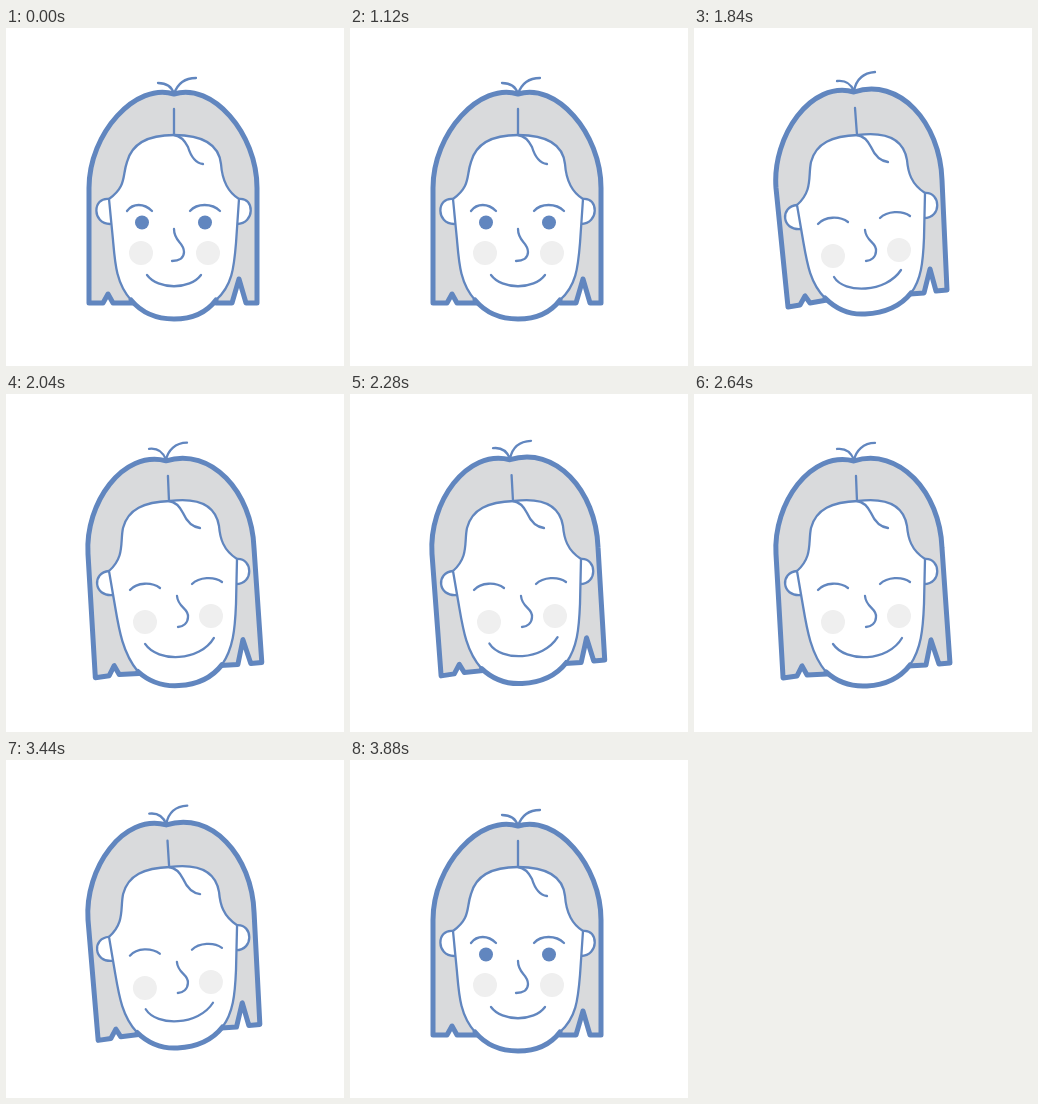
An HTML page for the animation above (5.32 s loop, 338x338 px).

```html
<!DOCTYPE html>
<html lang="en">
<head>
<meta charset="utf-8">
<title>Laughing face</title>
<style>
  html, body { margin: 0; width: 100%; height: 100%; overflow: hidden; background: #fff; }
  svg { display: block; width: 100%; height: 100%; }
  path { fill: none; stroke: #6186bf; stroke-width: 2.3; stroke-linecap: round; stroke-linejoin: round; }
  .thick { stroke-width: 5; }
  .hair { fill: #d9dadc; }
  .skin { fill: #fff; }
  .plain { stroke: none; }
</style>
</head>
<body>
<svg id="stage" viewBox="0 0 338 338"></svg>
<script>
const LOOP = 5320, STEP = 40, BOB = 560;
const stage = document.getElementById('stage');

// Each part: class, calm pose, laughing pose (head up), laughing pose (head down, if different)
const parts = [
  ['hair thick',
    'M127 275L107 275L102 266L97 275L83 275L83 160C83 105 130 54 168 66C206 54 251 105 251 160L251 275L240 275L233 251L226 275L210 275',
    'M133 272L116 275L111 268L106 277L94 279L82 160C78 108 117 52 160 64C205 49 246 94 248 152L253 262L242 263L236 241L230 265L216 266',
    'M133 280L113 281L108 272L103 282L89 284L82 160C79 109 117 56 160 67C205 53 246 98 248 154L256 269L245 270L237 246L232 271L214 272'],
  ['tuft',
    'M152 55C160 55 166 59 168 66C171 57 178 50 190 50',
    'M143 53C151 52 157 56 160 63C162 52 168 45 181 44',
    'M143 55C151 54 157 58 160 66C162 57 169 49 181 49'],
  ['skin',
    'M103 171C86 169 86 196 104 196',
    'M103 177C86 178 87 203 107 201'],
  ['skin',
    'M233 171C249 169 249 196 231 196',
    'M231 165C247 164 248 190 230 190'],
  ['skin',
    'M125 272C110 255 109 235 107 212L103 171C121 158 116 148 121 134C126 115 142 107 168 107C200 107 213 118 215 136C216 150 220 163 233 171L230 215C228 240 226 258 210 272',
    'M131 270C116 255 113 235 109 212L103 177C119 163 114 148 117 134C122 115 138 108 164 107C196 103 210 114 213 132C214 144 217 156 231 165L230 210C229 235 227 252 217 265',
    'M132 278C117 260 113 236 109 212L103 177C119 163 114 148 117 134C122 115 138 108 164 107C196 103 210 114 213 132C214 144 217 156 231 165L230 210C229 236 227 255 216 271'],
  ['skin plain',
    'M124 266L211 266L204 277L132 277',
    'M130 264L218 258L210 271L139 276',
    'M131 272L217 264L210 277L139 284'],
  ['skin thick',
    'M125 272C135 284 150 291 168 291C186 291 201 284 210 272',
    'M131 270C142 281 155 287 171 286C190 285 206 279 217 265',
    'M132 278C143 288 156 293 173 292C192 291 206 284 216 271'],
  ['parting',
    'M168 81L168 107',
    'M161 80L163 107',
    'M162 82L163 107'],
  ['curl',
    'M168 107C175 108 179 113 182 119C185 129 189 135 197 136',
    'M163 107C170 108 174 113 177 119C181 128 186 133 194 134'],
  ['nose',
    'M168 201C168 214 178 214 178 224C178 230 173 233 166 233',
    'M171 202C172 214 183 214 182 223C182 229 177 233 172 233'],
  ['mouth',
    'M141 247C152 262 184 262 195 247',
    'M140 249C150 266 192 265 207 242',
    'M139 250C152 269 194 268 208 244'],
  ['brow',
    'M121 183C127 175 138 175 146 183',
    'M124 196C131 188 146 188 154 194'],
  ['brow',
    'M184 183C191 175 206 175 214 183',
    'M186 190C193 183 208 182 216 188']
].map(([cls, calm, up, down = up]) => ({
  el: add('path', { class: cls }),
  shape: calm,
  poses: [calm, up, down].map(d => d.match(/\d+/g).map(Number))
}));

const cheeks = [[135, 225, 4, 3], [202, 225, 3, -3]].map(at =>
  [add('circle', { r: 12, fill: '#efefef' }), at]);
const eyes = [136, 199].map(cx => add('ellipse', { cx, cy: 194.5, rx: 7, fill: '#6186bf' }));

function add(tag, attrs) {
  const el = document.createElementNS('http://www.w3.org/2000/svg', tag);
  set(el, attrs);
  return stage.appendChild(el);
}

function set(el, attrs) {
  for (const key in attrs) el.setAttribute(key, attrs[key]);
}

const mix = (a, b, k) => a + (b - a) * k;

function ease(t, from, to) {
  const k = Math.min(1, Math.max(0, (t - from) / (to - from)));
  return k * k * (3 - 2 * k);
}

function draw(t) {
  const laugh = ease(t, 1120, 1400) - ease(t, 3400, 3800);
  const a = (t - 1280) / BOB * 2 * Math.PI;
  const drop = (1.2 - Math.cos(a) - 0.2 * Math.cos(2 * a)) / 2;

  for (const { el, shape, poses: [calm, up, down] } of parts) {
    let i = 0;
    set(el, { d: shape.replace(/\d+/g, () => {
      const n = mix(calm[i], mix(up[i], down[i], drop), laugh);
      i++;
      return n.toFixed(2);
    }) });
  }
  for (const [el, [x, y, dx, dy]] of cheeks) set(el, { cx: x + dx * laugh, cy: y + dy * laugh });
  for (const el of eyes) set(el, { ry: 7 * Math.max(0, 1 - 1.5 * laugh) });
}

const start = performance.now();
function frame() {
  const t = (performance.now() - start) % LOOP;
  draw(Math.floor(t / STEP) * STEP);
  requestAnimationFrame(frame);
}
frame();
</script>
</body>
</html>
```
